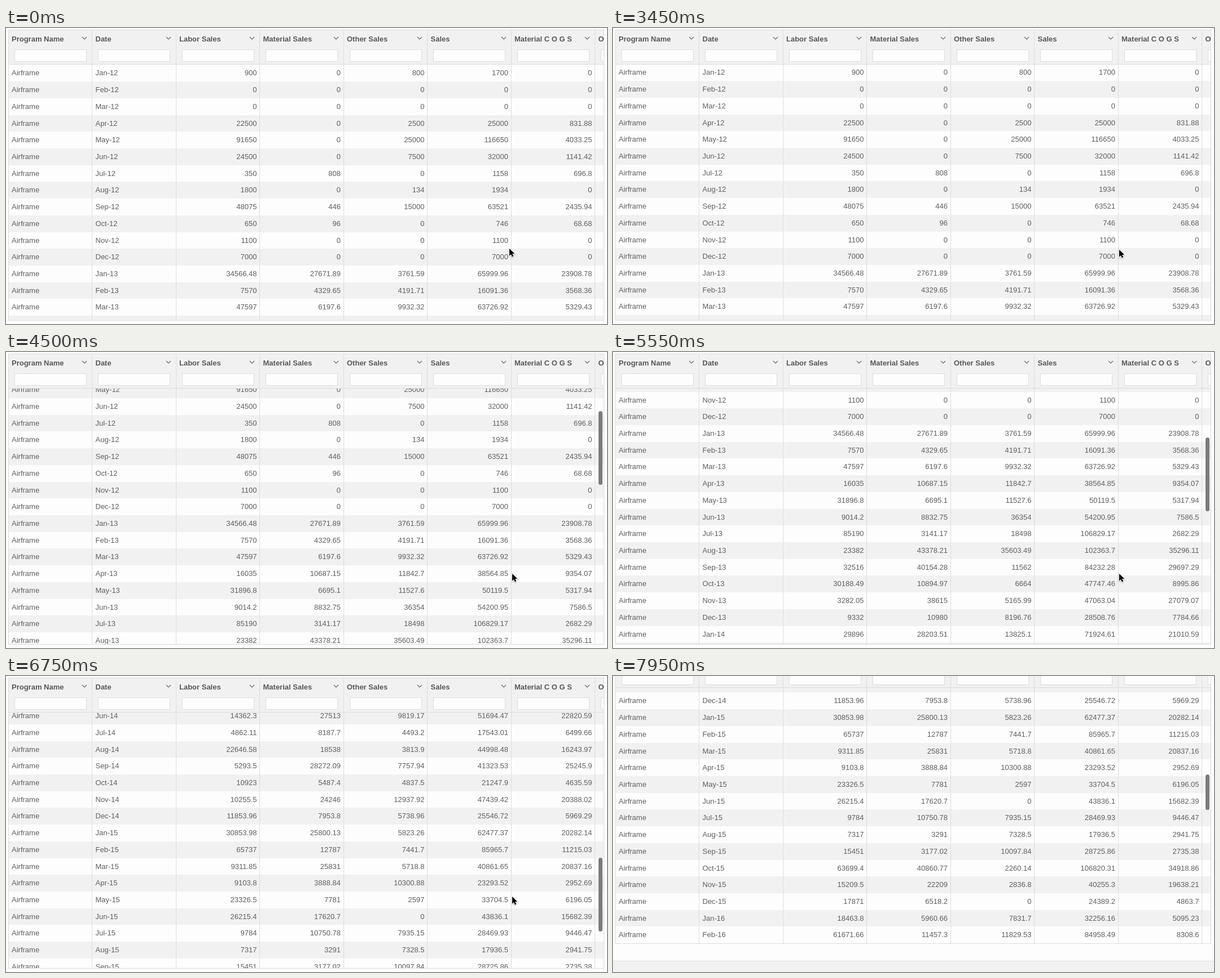
An HTML page for the animation above (8000 ms loop, 1065x526 px).

```html
<!DOCTYPE html>
<html lang="en">
<head>
<meta charset="utf-8">
<title>Sales grid</title>
<style>
html, body { margin: 0; width: 100%; height: 100%; overflow: hidden; background: #fdfdfd; }
body { position: relative; font: 13px "Liberation Sans", Arial, sans-serif; color: #606060; }
div, svg { position: absolute; box-sizing: border-box; }
#page { left: 0; top: 0; width: 1065px; height: 526px; }
#frame { left: 4px; top: 3px; width: 1056px; height: 517px; border: 1px solid #dcdcdc; }
#head { left: 5px; top: 4px; width: 1054px; height: 61px; overflow: hidden;
  background: #f1f1f1; border-bottom: 1px solid #dcdcdc; }
#head b { position: absolute; top: .5px; line-height: 30px; white-space: nowrap; color: #585858; }
.box { top: 34px; width: 128px; height: 22px; background: #fdfdfd; border: 1px solid #dedede; }
.chev { top: 10px; width: 10px; height: 8px; fill: none; stroke: #6a6a6a; stroke-width: 1.2; }
#body { left: 5px; top: 65px; width: 1054px; height: 454px; overflow: hidden; }
#rows { left: 0; top: 0; width: 1054px; }
.row { left: 0; width: 1054px; height: 29.72px; line-height: 29.72px; }
.row:nth-child(even), .flip .row:nth-child(odd) { background: #f1f1f1; }
.flip .row:nth-child(even) { background: none; }
.cell { top: 0; width: 148.5px; height: 100%; padding: 0 5px; white-space: nowrap; }
.num { text-align: right; }
.line { top: 4px; width: 1px; height: 515px; background: #dedede; }
#thumb { left: 1050px; top: 0; width: 7px; border-radius: 4px; background: #7b7b7b; }
#foot { left: 0; top: 550px; width: 1065px; height: 80px; background: #f1f1f1; border-top: 1px solid #dcdcdc; }
#cursor { left: 0; top: 0; width: 18px; height: 24px; overflow: visible;
  filter: drop-shadow(0 1px 1px rgba(0, 0, 0, .3)); }
</style>
</head>
<body>
<div id="page">
  <div id="frame"></div>
  <div id="body"><div id="rows"></div></div>
  <div id="head"></div>
  <div id="thumb"></div>
  <div id="foot"></div>
</div>
<svg id="cursor"><path d="M0 0V13.4L3.1 10.5 5.2 15.3 7.5 14.3 5.5 9.6H9.7Z" transform="scale(.95)"
  fill="#000" stroke="#fff" stroke-width="1.6" paint-order="stroke"/></svg>
<script>
const LOOP = 8000, TICK = 150, PITCH = 148.5, ROW = 29.714, ROWS = 50, MAX = 1032;
const $ = id => document.getElementById(id);
const months = 'Jan Feb Mar Apr May Jun Jul Aug Sep Oct Nov Dec'.split(' ');
const titles = ['Program Name', 'Date', 'Labor Sales', 'Material Sales',
  'Other Sales', 'Sales', 'Material C O G S', 'Other C O G S'];

// First-year amounts by month index; missing months are zero
const firstYear = {
  labor: { 0: 900, 3: 22500, 4: 91650, 5: 24500, 6: 350, 7: 1800, 8: 48075, 9: 650, 10: 1100, 11: 7000 },
  material: { 6: 808, 8: 446, 9: 96 },
  other: { 0: 800, 3: 2500, 4: 25000, 5: 7500, 7: 134, 8: 15000 },
  cogs: { 3: 831.88, 4: 4033.25, 5: 1141.42, 6: 696.8, 8: 2435.94, 9: 68.68 }
};

function random(i, k) {
  const v = Math.sin(i * 12.9898 + k * 78.233) * 43758.5453;
  return v - Math.floor(v);
}

// Amount spread around 10^size with up to two decimals
function amount(i, k, size) {
  const value = 10 ** (size + .8 * (random(i, k) + random(i, k + 1) - 1));
  return +value.toFixed(Math.min(2, Math.floor(4 * random(i, k + 2))));
}

function record(i) {
  const pick = name => firstYear[name][i] || 0;
  if (i < 12) return [pick('labor'), pick('material'), pick('other'), pick('cogs')];
  const material = amount(i, 4, 4);
  const other = random(i, 10) < .1 ? 0 : amount(i, 7, 3.9);
  const cogs = +(material * (.7 + .2 * random(i, 11))).toFixed(2);
  return [amount(i, 1, 4.2), material, other, cogs];
}

function add(parent, html) { parent.insertAdjacentHTML('beforeend', html); }

titles.forEach((title, i) => {
  const x = i * PITCH;
  add($('head'), `<b style="left:${x + 5}px">${title}</b>
    <div class="box" style="left:${Math.floor(x + 10)}px"></div>
    <svg class="chev" style="left:${x + 129}px"><path d="M1 2L5 6L9 2"/></svg>`);
  if (i) {
    const line = document.createElement('div');
    line.className = 'line';
    line.style.left = Math.floor(4 + x) + 'px';
    $('page').insertBefore(line, $('thumb'));
  }
});

for (let i = 0; i < ROWS; i++) {
  const [labor, material, other, cogs] = record(i);
  const sales = +(labor + material + other).toFixed(2);
  const date = months[i % 12] + '-' + (12 + Math.floor(i / 12));
  const cells = ['Airframe', date, labor, material, other, sales, cogs];
  add($('rows'), `<div class="row" style="top:${i * ROW + .4}px">` + cells.map((c, k) =>
    `<div class="cell${k > 1 ? ' num' : ''}" style="left:${k * PITCH - (k > 1)}px">${c}</div>`
  ).join('') + '</div>');
}

// Keys: time, value, speed per tick
const scrollKeys = [[3300, 0, 0], [3450, 1, 4], [4500, 132, 22], [5550, 292, 36],
  [6750, 871, 85], [7050, MAX, 70]];
const pageKeys = [[7050, 0, 22], [7350, 44, 6], [7500, 46, 0], [7950, 44, 0]];

function curve(keys, t) {
  if (t <= keys[0][0]) return keys[0][1];
  const i = keys.findIndex(k => k[0] >= t);
  if (i < 0) return keys[keys.length - 1][1];
  const [t0, a, va] = keys[i - 1], [t1, b, vb] = keys[i];
  const n = (t1 - t0) / TICK, u = (t - t0) / (t1 - t0), w = 1 - u;
  return a * w * w * (1 + 2 * u) + b * u * u * (3 - 2 * u) + n * u * w * (va * w - vb * u);
}

const move = (el, x, y) => { el.style.transform = `translate(${x}px,${y}px)`; };

function draw(now) {
  const t = Math.floor((now % LOOP) / TICK) * TICK;
  const scroll = Math.round(curve(scrollKeys, t));
  move($('rows'), 0, -scroll);
  move($('page'), 0, -Math.round(curve(pageKeys, t)));

  // Stripes swap each time the grid recycles a batch of rows
  $('rows').classList.toggle('flip', Math.floor(scroll / 131) % 2 === 1);

  // More rows load at the end, so the thumb shrinks
  const loaded = t >= 7650;
  $('thumb').style.visibility = t >= 3600 ? 'visible' : 'hidden';
  $('thumb').style.height = (loaded ? 63 : 131) + 'px';
  move($('thumb'), 0, Math.round(66.2 + scroll * (loaded ? .148 : .295)));

  $('cursor').style.visibility = t < 7650 ? 'visible' : 'hidden';
  move($('cursor'), t < TICK ? 892 : 897, t < TICK || t >= 6600 ? 392 : 394);
}

let start;
function tick(now) {
  start ??= now;
  draw(now - start);
  requestAnimationFrame(tick);
}
draw(0);
requestAnimationFrame(tick);
</script>
</body>
</html>
```
